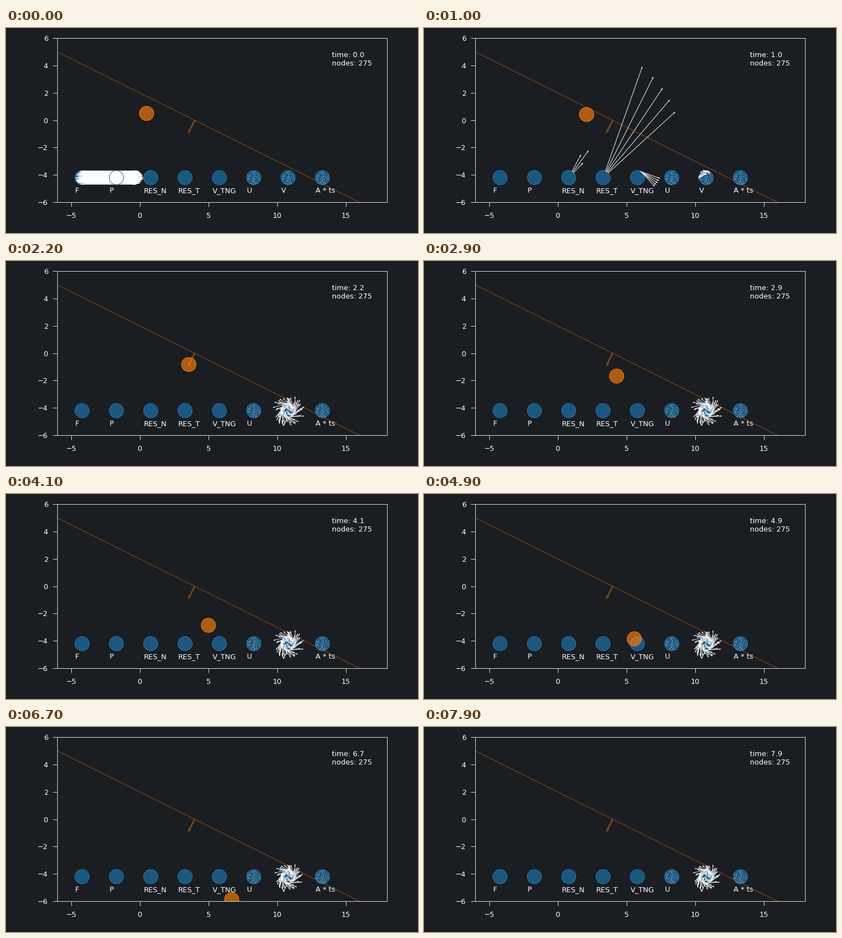
Write a matplotlib script that moves like this. It is 732 by 366 pixels and loops after 8000 ms.

```python
import numpy as np
import matplotlib.pyplot as plt
from matplotlib.animation import FuncAnimation
from matplotlib.tri import Triangulation

FRAMES, STEP = 80, 0.1
BG, BLUE, ORANGE, FRAME_COLOR = "#1a1d21", "#1f77b4", "#ff7f0e", "#d8d8d8"
LABELS = ["F", "P", "RES_N", "RES_T", "V_TNG", "U", "V", "A * ts"]
RADIUS, NODES = 0.5, 275

plt.rcParams.update({"font.family": "DejaVu Sans", "font.size": 10,
                     "text.color": "white", "path.simplify": False})
rng = np.random.default_rng(4)


def polar(angle, length=1.0):
    return np.column_stack([length * np.cos(angle), length * np.sin(angle)])


def rotate(points, angle):
    c, s = np.cos(angle), np.sin(angle)
    return points @ np.array([[c, s], [-s, c]])


def stretch(points, amount, angle):
    return rotate(rotate(points, -angle) * [1 + amount, 1 - amount], angle)


def disk_nodes():
    """Triangular lattice trimmed to the nodes nearest the centre."""
    a = np.sqrt(np.pi * RADIUS**2 / NODES / 0.866)
    i, j = np.mgrid[-25:26, -25:26]
    grid = a * np.column_stack([(i + j / 2).ravel(), (j * 0.866).ravel()]) + 0.01
    nearest = np.argsort(np.hypot(*grid.T), kind="stable")[:NODES]
    return rotate(grid[nearest], -0.78)


def ball_position(t):
    """Straight run, contact with the slope, then a slow fall to the right."""
    keys = np.array([(0, 0.5, 0.5), (1, 2.1, 0.42), (1.5, 2.85, 0.03),
                     (2.9, 4.29, -1.67), (4.1, 5.0, -2.86), (5.7, 6.15, -4.83),
                     (7.2, 6.97, -6.4), (8, 7.4, -7.2)])
    return np.array([np.interp(t, keys[:, 0], keys[:, k]) for k in (1, 2)])


def spin_rate(t):
    since = max(t - 0.9, 0)
    return 2.3 * (1 - np.exp(-since / 0.25)) * np.exp(-0.03 * since)


def contact_strength(t):
    """One half-sine pulse, equal to 1 at t = 1."""
    phase = np.clip((t - 0.9) / 0.45, 0, 1)
    return np.sin(np.pi * phase) / np.sin(np.pi * 0.1 / 0.45)


nodes = disk_nodes()
edges = Triangulation(*nodes.T).edges
ring = polar(np.linspace(0, 2 * np.pi, 73), 0.52)
times = np.arange(FRAMES) * STEP
turn = np.cumsum([spin_rate(t) for t in times]) * STEP

fig = plt.figure(figsize=(8, 4), dpi=91.5, facecolor=BG)
ax = fig.add_axes([0.1246, 0.15, 0.8, 0.8], facecolor=BG)
ax.set(xlim=(-6, 18), ylim=(-6, 6), xticks=range(-5, 16, 5), yticks=range(-6, 7, 2))
ax.tick_params(length=6, width=0.8, color=FRAME_COLOR, labelcolor="white")
ax.tick_params(axis="x", pad=8)
ax.tick_params(axis="y", pad=7)
for spine in ax.spines.values():
    spine.set(color=FRAME_COLOR, linewidth=0.8)


def arrows(origin, vectors, z, **style):
    style = {"color": "white", "width": 0.0016, "headwidth": 3, **style}
    return ax.quiver(*origin.T, *vectors.T, angles="xy", scale_units="xy", scale=1,
                     zorder=z, **style)


ax.plot([-6, 16], [5, -6], color=ORANGE, alpha=0.35, lw=1.2, zorder=0.5)
arrows(np.array([[4, 0]]), np.array([[-0.5, -1]]), 0.6, color=ORANGE, alpha=0.4,
       width=0.005, headwidth=2, headlength=3, headaxislength=2.7)


class Disk:
    def __init__(self, color, mesh_z, ring_z):
        self.body, = ax.fill([0, 0], [0, 0], color=color, alpha=0.5, lw=0, zorder=mesh_z)
        self.mesh, = ax.plot([], [], color=color, lw=0.2, alpha=0.4, zorder=mesh_z)
        self.ring, = ax.plot([], [], color=color, lw=0.8, zorder=ring_z)

    def place(self, center, points, outline):
        lines = np.full((len(edges), 3, 2), np.nan)
        lines[:, :2] = points[edges] + center
        self.mesh.set_data(*lines.reshape(-1, 2).T)
        self.body.set_xy(outline + center)
        self.ring.set_data(*(outline + center).T)


centers = [np.array([-4.2 + 2.5 * k, -4.2]) for k in range(len(LABELS))]
disks = [Disk(BLUE, 1, 2 + k) for k in range(len(LABELS))]
ball = Disk(ORANGE, 20, 21)
for label, center in zip(LABELS, centers):
    ax.text(center[0] - 0.5, -5.3, label, zorder=30)
info = ax.text(14, 4, "", zorder=30)

pushed = nodes[rng.choice(NODES, 130, replace=False)]
force = arrows(pushed + centers[0], np.tile([4.0, 0.0], (len(pushed), 1)), 2.5)

# Contact arrows fan out from the touching part of the rim.
fan = np.radians(np.linspace(70.6, 42.5, 5))
normal_fan = np.radians(np.linspace(62, 46, 3))
contact_fans = [
    (2, normal_fan, polar(normal_fan, 2 * np.sin(np.linspace(0.8, 2.6, 3)))),
    (3, fan, polar(fan, np.linspace(8.14, 6.65, 5))),
    (4, fan, polar(fan - np.pi / 2, np.linspace(1.6, 1.36, 5))),
]
contact_arrows = [(arrows(polar(angles, RADIUS) + centers[k], vec, 2.5 + k), vec)
                  for k, angles, vec in contact_fans]

whirl_nodes = nodes[rng.choice(NODES, 75, replace=False)]
whirl_dir = whirl_nodes[:, ::-1] * [-1, 1] + rng.normal(0, 0.03, whirl_nodes.shape)
whirl = arrows(whirl_nodes + centers[6], whirl_dir, 8.5, width=0.0014)

specks = rng.choice(NODES, 70, replace=False)
dots = {k: ax.plot([], [], "o", ms=0.7, mew=0, color="white", alpha=0.55,
                   zorder=2.5 + k)[0] for k in (5, 6, 7)}


def update(i):
    t = times[i]
    info.set_text(f"time: {t:.1f}\nnodes: {NODES}")

    squash = 0.1 * np.clip((t - 0.95) / 0.3, 0, 1) * np.exp(-(t - 1) / 0.6)
    blue_nodes, blue_ring = (stretch(p, squash, 2.1) for p in (nodes, ring))
    for disk, center in zip(disks, centers):
        disk.place(center, blue_nodes, blue_ring)
    ball.place(ball_position(t), stretch(rotate(nodes, turn[i]), squash, -0.17),
               stretch(ring, squash, -0.17))

    force.set_visible(i == 0)
    strength = contact_strength(t)
    for quiver, vec in contact_arrows:
        quiver.set_visible(strength > 0.01)
        quiver.set_UVC(*(vec * strength).T)

    # The spin starts in the touching nodes at the top and spreads downwards.
    reach = np.interp(t, [0.9, 1.0, 1.1], [0.6, 0.2, -0.6])
    moving = whirl_nodes[:, 1:] > reach
    whirl.set_UVC(*np.where(moving, spin_rate(t) * whirl_dir, np.nan).T)
    whirl.set_visible(bool(moving.any()))

    for k, line in dots.items():
        line.set_data(*(blue_nodes[specks] + centers[k]).T)
    dots[6].set_visible(t < 1.05)


anim = FuncAnimation(fig, update, frames=FRAMES, interval=100, repeat=True,
                     repeat_delay=0)
plt.show()
```
